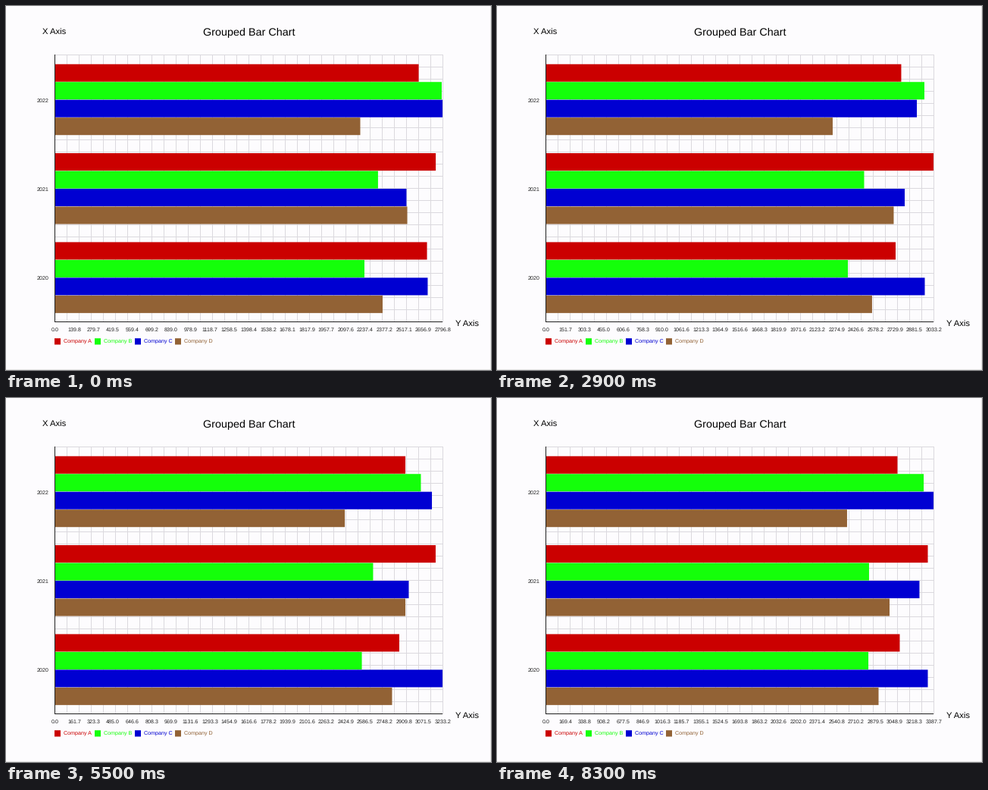
A matplotlib script that plays this animation: 640x480 px, repeating every 8400 ms.

```python
import numpy as np
import matplotlib.pyplot as plt
from matplotlib.animation import FuncAnimation
from matplotlib.patches import Rectangle

plt.rcParams["font.family"] = "Liberation Sans"
plt.rcParams["text.hinting"] = "none"

W, H, DPI = 640, 480, 100
FRAMES, STEP = 84, 100
LEFT, RIGHT, TOP, BOTTOM = 64, 576, 64, 416
SPAN = RIGHT - LEFT
GROUP = (BOTTOM - TOP) / 3
BAR = GROUP / 5
CELL = 16
PX = 72 / DPI

COLORS = ["#cb0000", "#14ff0a", "#0000d2", "#926235"]
GRID, INK = "#dbd9de", "#202020"

# Each bar grows steadily between four key values; rows are companies A to D
TIMES = [0, 29, 55, 83]
GROWTH = {
    "2022": [(2625, 2781, 2924, 3073), (2791, 2962, 3053, 3302),
             (2796.76, 2903, 3145, 3387.7), (2204, 2245, 2419, 2633)],
    "2021": [(2748, 3033.2, 3176, 3338), (2332, 2491, 2655, 2825),
             (2537, 2808, 2952, 3265), (2543, 2722, 2924, 3004)],
    "2020": [(2685, 2737, 2873, 3093), (2234, 2364, 2561, 2819),
             (2690, 2965, 3233.16, 3338), (2365, 2553, 2813, 2908)],
}

fig = plt.figure(figsize=(W / DPI, H / DPI), dpi=DPI, facecolor="#fdfcfe")
ax = fig.add_axes([0, 0, 1, 1])
ax.set_xlim(0, W)
ax.set_ylim(H, 0)
ax.axis("off")


def line(x, y, color, z=1):
    ax.plot(x, y, color=color, lw=PX, zorder=z, solid_capstyle="butt", snap=False)


def box(x, y, w, h, color, z=2):
    return ax.add_patch(Rectangle((x, y), w, h, fc=color, lw=0, zorder=z, snap=False))


def label(x, y, text, size, color="black", ha="left"):
    return ax.text(x, y, text, fontsize=size * PX, color=color, ha=ha,
                   va="baseline", zorder=5)


for x in range(LEFT, RIGHT + 1, CELL):
    line([x + 0.5] * 2, [TOP, BOTTOM], GRID)
for y in range(TOP, BOTTOM + 1, CELL):
    line([LEFT, RIGHT + 1], [y + 0.5] * 2, GRID)
line([LEFT + 0.5] * 2, [TOP, BOTTOM + 1], INK, 4)
line([LEFT, RIGHT], [BOTTOM + 0.5] * 2, INK, 4)
line([W - 0.5] * 2, [0, H], "#e4e4e4")
line([0, W], [H - 0.5] * 2, "#e4e4e4")

label(320.5, 39.3, "Grouped Bar Chart", 14.4, ha="center")
label(48, 38.3, "X Axis", 11.2)
label(593, 422.6, "Y Axis", 11.2)

for k, color in enumerate(COLORS):
    x = LEFT + 53 * k
    box(x, 438.2, 8, 8.3, color)
    label(x + 12, 445, f"Company {'ABCD'[k]}", 7.2, color)

bars = []
for g, (year, rows) in enumerate(GROWTH.items()):
    label(57, 126.6 + g * GROUP, year, 7.2, INK, "right")
    for k, row in enumerate(rows):
        y = TOP + 1 + BAR / 2 + g * GROUP + k * BAR
        bars.append((box(LEFT, y, 0, BAR - 0.4, COLORS[k], 3), row))
ticks = [label(LEFT + 0.3 + SPAN * i / 20, 429, "", 7.2, INK, "center")
         for i in range(21)]


def update(frame):
    now = [np.interp(frame, TIMES, row) for _, row in bars]
    top = max(now)
    for (bar, _), v in zip(bars, now):
        bar.set_width(SPAN * v / top)
    for i, tick in enumerate(ticks):
        tick.set_text(f"{top * i / 20:.1f}")
    return ticks


anim = FuncAnimation(fig, update, frames=FRAMES, interval=STEP,
                     repeat=True, repeat_delay=0, blit=False)
plt.show()
```
